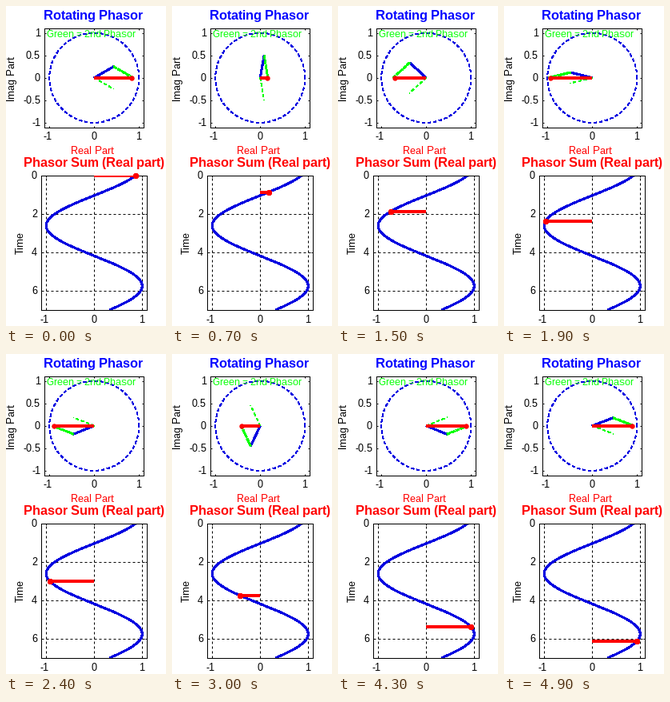
Write a matplotlib script that moves like this. It is 200 px wide and 400 px high and loops after 5 s.

```python
import numpy as np
import matplotlib.pyplot as plt
from matplotlib.animation import FuncAnimation

W, H, DPI = 200, 400, 100
FRAMES, INTERVAL = 50, 100
PHASE, STEP = np.pi / 6, 0.125
PT = 72 / DPI  # points per pixel
BLUE = "#0000e0"

plt.rcParams.update({"font.family": "Liberation Sans",
                     "text.hinting": "default", "text.hinting_factor": 1})
fig = plt.figure(figsize=(W / DPI, H / DPI), dpi=DPI, facecolor="white")


def make_axes(left, top, right, bottom, xlim, ylim):
    """Axes placed by pixel edges, with inward ticks on all four sides."""
    ax = fig.add_axes([(left + 0.25) / W, 1 - (bottom - 0.25) / H,
                       (right - left) / W, (bottom - top) / H])
    ax.set(xlim=xlim, ylim=ylim)
    ax.tick_params(direction="in", length=2 * PT, width=PT, top=True, right=True,
                   labelbottom=False, labelleft=False)
    for spine in ax.spines.values():
        spine.set_linewidth(PT)
    return ax


def write(x, baseline, text, size=13.3, color="black", ha="center", **kw):
    fig.text(x / W, 1 - baseline / H, text, fontsize=size * PT, color=color,
             ha=ha, va="baseline", rotation_mode="anchor", **kw)


def line(ax, color, width, dash=None, **kw):
    artist, = ax.plot([], [], color=color, lw=width * PT, solid_capstyle="butt",
                      dash_capstyle="butt", antialiased=False, **kw)
    if dash:
        artist.set_linestyle((0, [d / width for d in dash]))
    return artist


plane = make_axes(48, 28, 172, 152, (-1.107, 1.107), (-1.107, 1.107))
plane.set_xticks([-1, 0, 1])
plane.set_yticks(np.arange(-1, 1.1, 0.5))

wave = make_axes(44, 212, 176, 380, (-1.1, 1.1), (7, 0))
wave.set_xticks([-1, 0, 1])
wave.set_yticks([0, 2, 4, 6])
wave.set_axisbelow(True)
wave.grid(color="black", lw=PT, linestyle=(0, (3, 3)))

write(109, 17, "Rotating Phasor", 16, "blue", weight="bold")
write(109.5, 201, "Phasor Sum (Real part)", 16, "red", weight="bold")
write(108, 185, "Real Part", 13, "red")
write(11, 91, "Imag Part", rotation=90)
write(22, 296, "Time", rotation=90)
write(106.5, 39, "Green = 2nd Phasor", 12, "lime")
for value in (1, 0.5, 0, -0.5, -1):
    write(43, 94.5 - 56 * value, f"{value:g}", 13, ha="right")
for value in (0, 2, 4, 6):
    write(39, 216 + 24 * value, str(value), 13, ha="right")
for value in (-1, 0, 1):
    shift = 2 if value < 0 else 0
    write(110 + 56 * value - shift, 167, str(value), 13)
    write(110 + 60 * value - shift, 395.5, str(value), 13)

angle = np.linspace(0, 2 * np.pi, 200)
line(plane, BLUE, 1, (3, 3)).set_data(np.cos(angle), np.sin(angle))
time = np.linspace(0, 7, 300)
line(wave, BLUE, 2).set_data(np.cos(time + PHASE), time)

first = line(plane, BLUE, 2)
second = line(plane, "lime", 1, (4, 3))
moved = line(plane, "lime", 2, (5, 2))
total = line(plane, "red", 4, zorder=3)
total_end = line(plane, "red", 1, marker="o", ms=5 * PT, zorder=4)
level = line(wave, "red", 4, zorder=3)
level_end = line(wave, "red", 1, marker=(8, 2, 0), ms=7 * PT, mew=2 * PT,
                 clip_on=False, zorder=4)


def update(n):
    t = n * STEP
    c, s = np.cos(t + PHASE), np.sin(t + PHASE)
    first.set_data([0, c / 2], [0, s / 2])
    second.set_data([0, c / 2], [0, -s / 2])
    moved.set_data([c / 2, c], [s / 2, 0])
    total.set_data([0, c], [0, 0])
    total_end.set_data([0.96 * c], [0])
    level.set_data([0, c], [t, t])
    level_end.set_data([c], [t])
    return first, second, moved, total, total_end, level, level_end


anim = FuncAnimation(fig, update, frames=FRAMES, interval=INTERVAL,
                     repeat=True, repeat_delay=0)
plt.show()
```
